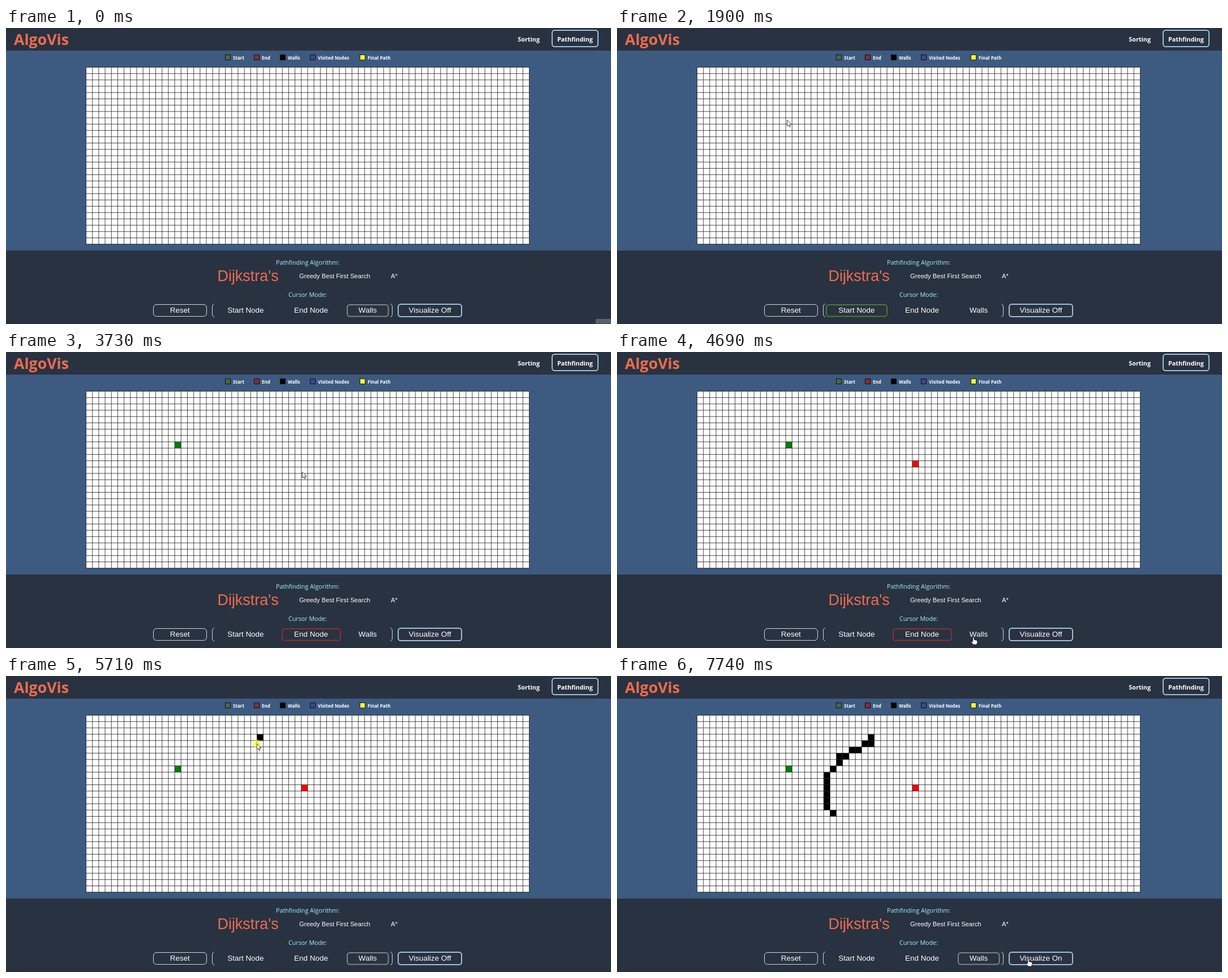
Write an HTML page that moves like this. It is 1069 by 524 pixels and loops after 8000 ms.

```html
<!DOCTYPE html>
<html lang="en">
<head>
<meta charset="utf-8">
<title>AlgoVis</title>
<style>
  html, body { margin: 0; width: 100%; height: 100%; overflow: hidden; background: #3d5a80; }
  svg { display: block; width: 1069px; height: 524px; }
  text { fill: #fff; font-family: "Liberation Sans", Arial, sans-serif; }
  .nav, .legend, .label { font-family: "Open Sans", "Noto Sans", sans-serif; }
  .nav, .legend { font-weight: 700; }
  .nav { font-size: 10.8px; }
  .legend { font-size: 8.1px; }
  .label { font-size: 10.7px; fill: #a4f4ff; }
  .algo { font-size: 11.2px; }
  .button { font-size: 13.44px; }
  .nav, .label, .button { text-anchor: middle; }
  .orange { fill: #ee6c4d; }
  .outline { fill: none; stroke-width: 2; }
  .blue { stroke: #98c1d9; }
  .white { stroke: #fff; stroke-width: .8; }
  #grid { stroke: #111; stroke-width: .75; }
  #arrow, #hand { fill: #fff; stroke: #111; stroke-width: .8; stroke-linejoin: round; }
</style>
</head>
<body>
<svg viewBox="0 0 1069 524">
  <path fill="#293241" d="M0 0H1069V40H0ZM0 394H1069V524H0Z"/>
  <text class="nav orange" x="14" y="29.5" style="font-size:26.7px;text-anchor:start">AlgoVis</text>
  <text class="nav" x="923.7" y="23.7">Sorting</text>
  <text class="nav" x="1005.5" y="23.7">Pathfinding</text>
  <rect class="outline blue" x="965" y="4" width="81" height="29" rx="4.5"/>
  <g id="legend"></g>

  <rect x="141.5" y="69.5" width="783" height="313" fill="#fff"/>
  <g id="cells"></g>
  <path id="grid"/>

  <text class="label" x="533" y="419.3">Pathfinding Algorithm:</text>
  <text class="orange" x="373.5" y="448" font-size="26.9">Dijkstra's</text>
  <text class="algo" x="518" y="443">Greedy Best First Search</text>
  <text class="algo" x="680" y="443">A*</text>
  <text class="label" x="533" y="476.3">Cursor Mode:</text>

  <rect class="outline white" x="260.5" y="489.5" width="94" height="21" rx="5.5"/>
  <path class="outline white" d="M368 488.5Q364.5 489 364.5 494V506Q364.5 511 368 511.5M679 488.5Q682.5 489 682.5 494V506Q682.5 511 679 511.5"/>
  <rect id="mode" class="outline" y="490" height="20.5" rx="4.5"/>
  <rect class="outline blue" x="693" y="489" width="112" height="22" rx="4.5"/>
  <text class="button" x="307.3" y="504.3">Reset</text>
  <text class="button" x="423.4" y="504.3">Start Node</text>
  <text class="button" x="539" y="504.3">End Node</text>
  <text class="button" x="639" y="504.3">Walls</text>
  <text class="button" id="toggle" x="749" y="504.3">Visualize Off</text>

  <g id="hint">
    <rect x="1042" y="515" width="27" height="9" fill="#5a626d"/>
    <text x="1045" y="526" font-size="8" style="fill:#3c444f">Pause</text>
  </g>
  <g id="cursor">
    <circle id="press" r="7" fill="#ff0" fill-opacity=".6"/>
    <path id="arrow" d="M0 0V10.6L2.5 8.4L4.2 12.2L5.9 11.4L4.3 7.7H7.6Z"/>
    <path id="hand" d="M-1.3 8V.9a1.2 1.2 0 0 1 2.4 0V4.5l4 .8q1.6.4 1.6 2v2l-1.2 3.7h-6l-3.2-4.2q-.8-1.4.6-1.5z"/>
  </g>
</svg>
<script>
const $ = id => document.getElementById(id);
const LOOP = 8000, STEP = 68; // the picture advances once per STEP ms
const COLS = 70, ROWS = 28, SIZE = 783 / COLS;
const gx = c => 141.5 + c * SIZE;
const gy = r => 69.5 + r * SIZE;
const mix = (a, b, k) => a + (b - a) * k;
const easeOut = u => 1 - (1 - u) ** 3;
const show = (el, on) => { el.style.display = on ? "" : "none"; };

function add(parent, tag, attrs, text = "") {
  const el = document.createElementNS("http://www.w3.org/2000/svg", tag);
  for (const name in attrs) el.setAttribute(name, attrs[name]);
  el.textContent = text;
  return parent.appendChild(el);
}
const addCell = (c, r, fill) =>
  add($("cells"), "rect", { x: gx(c), y: gy(r), width: SIZE, height: SIZE, fill });

[["Start", 387.5, "#4a6648"], ["End", 438.5, "#7d303c"], ["Walls", 484.5, "#000"],
 ["Visited Nodes", 537.5, "#3f4784"], ["Final Path", 625.5, "#ffff33"]].forEach(([name, x, fill]) => {
  add($("legend"), "rect", { x, y: 47.5, width: 9, height: 9, fill, stroke: "#000", "stroke-width": .8 });
  add($("legend"), "text", { class: "legend", x: x + 13.5, y: 55.7 }, name);
});

let lines = "";
for (let c = 0; c <= COLS; c++) lines += `M${gx(c)} ${gy(0)}V${gy(ROWS)}`;
for (let r = 0; r <= ROWS; r++) lines += `M${gx(0)} ${gy(r)}H${gx(COLS)}`;
$("grid").setAttribute("d", lines);

const startCell = addCell(14, 8, "green");
const endCell = addCell(34, 11, "red");

// The wall joins a few corners with straight runs of cells
const wall = [[27, 3]];
for (const [c, r] of [[27, 4], [24, 5], [22, 6], [22, 7], [20, 9], [20, 14], [21, 15]]) {
  const [c0, r0] = wall[wall.length - 1];
  const n = Math.max(Math.abs(c - c0), Math.abs(r - r0));
  for (let i = 1; i <= n; i++) wall.push([mix(c0, c, i / n), Math.round(mix(r0, r, i / n))]);
}
const wallCells = wall.map(([c, r]) => addCell(c, r, "#000"));
const DRAW = 83, DRAWN = 91;
const drawn = s => Math.min(1, Math.max(0, (s - DRAW) / (DRAWN - DRAW)));

function wallPoint(k) {
  const p = k ** 1.1 * (wall.length - 1), i = Math.min(Math.floor(p), wall.length - 2);
  const [c, r] = [0, 1].map(axis => mix(wall[i][axis], wall[i + 1][axis], p - i) + .5);
  return [gx(c), gy(r)];
}

// Cursor moves: first step, last step, x, y reached
const moves = [
  [0, 9, 340, 256], [9, 17, 426, 501], [20, 29, 300.5, 162.5], [36.5, 47, 523, 492],
  [49.5, 58, 523.5, 199.5], [60.5, 68, 630, 505], [73, 79, 420, 114], [79, 82, 455, 113],
  [93, 105, 727, 501]
];
const presses = [[20, 21], [35, 37], [48, 50], [59, 61], [71, 73], [DRAW, 94], [111, 114]];
const modes = {
  walls: [603, 72.5, "#808080"],
  start: [370, 107, "#4a7c2f"],
  end: [488, 103, "#8b2f36"]
};
const modeAt = s => s >= 21 && s < 49 ? "start" : s >= 49 && s < 72 ? "end" : "walls";
const buttons = [[260, 355], [369, 478], [487, 592], [602, 677], [692, 806]];

function position(s) {
  if (s >= DRAW && s < 93) return wallPoint(drawn(s));
  let [x, y] = [1055, 520];
  for (const [from, to, x1, y1] of moves) {
    if (s < from) break;
    if (from > DRAW) [x, y] = wallPoint(1);
    const k = easeOut(Math.min(1, (s - from) / (to - from)));
    [x, y] = [mix(x, x1, k), mix(y, y1, k)];
  }
  return [x, y];
}

function render(t) {
  const s = Math.floor((t + 12) / STEP);
  const [x, y] = position(s);
  const over = y > 488 && y < 512 && buttons.some(([a, b]) => x > a && x < b);
  $("cursor").setAttribute("transform", `translate(${x} ${y})`);
  show($("cursor"), s > 0);
  show($("hint"), s === 0);
  show($("hand"), over);
  show($("arrow"), !over);
  show($("press"), presses.some(([a, b]) => s >= a && s < b));

  show(startCell, s >= 35);
  show(endCell, s >= 59);
  wallCells.forEach((el, i) => show(el, i < wall.length * drawn(s) ** 1.4));

  const [left, width, stroke] = modes[modeAt(s)];
  $("mode").setAttribute("x", left);
  $("mode").setAttribute("width", width);
  $("mode").setAttribute("stroke", stroke);
  $("toggle").textContent = s < 113 ? "Visualize Off" : "Visualize On";
}

const start = performance.now();
function tick() {
  render((performance.now() - start) % LOOP);
  requestAnimationFrame(tick);
}
tick();
</script>
</body>
</html>
```
